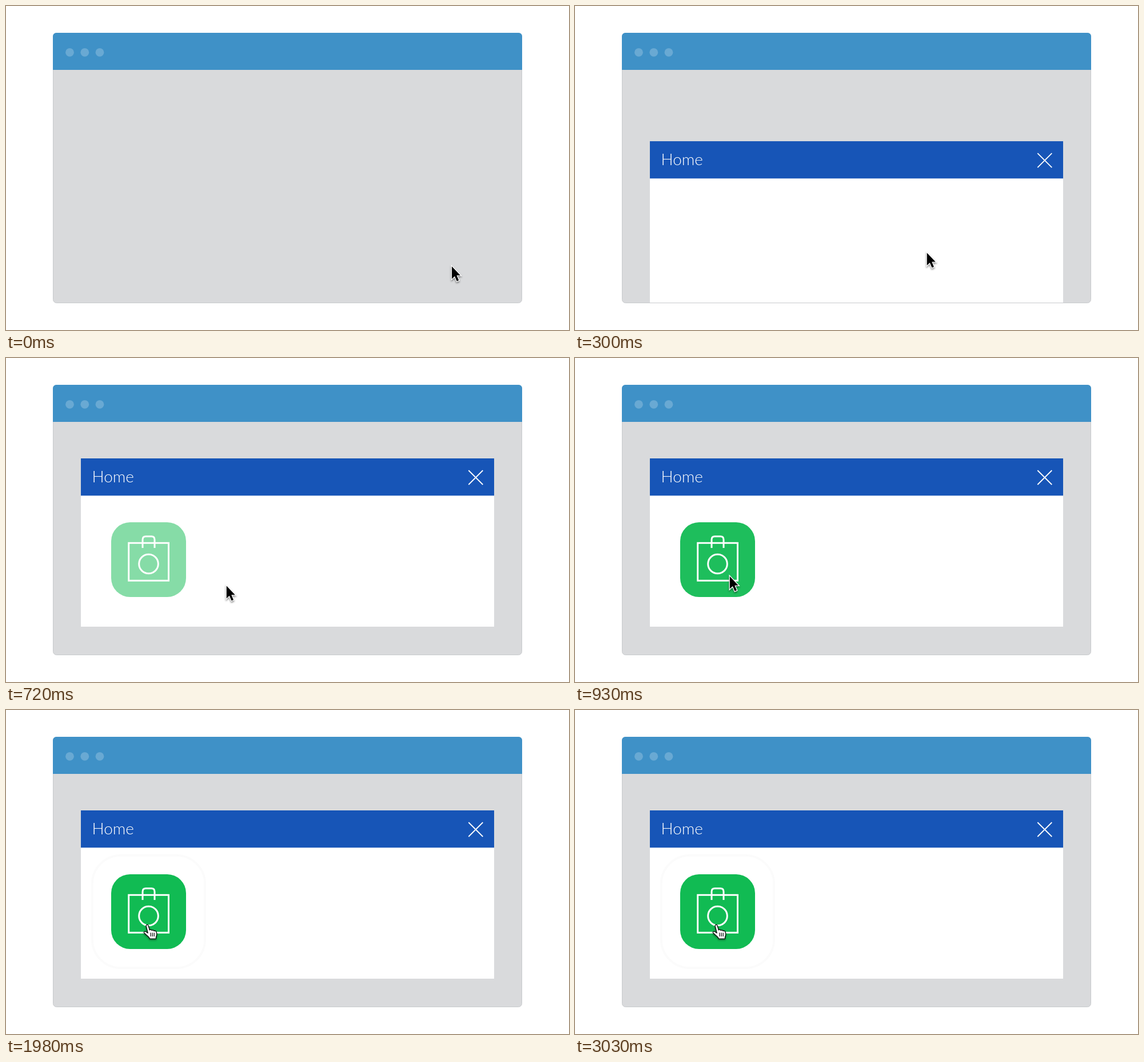
An HTML page that plays this animation: 985x568 px, repeating every 5.15 s.

```html
<!DOCTYPE html>
<html lang="en">
<head>
<meta charset="utf-8">
<title>Home window</title>
<style>
  html, body { margin: 0; width: 100%; height: 100%; overflow: hidden; background: #fff; }
  svg { display: block; width: 985px; height: 568px; }
  text { font: 300 28px Lato, sans-serif; fill: #fff; }
  .cursor { filter: drop-shadow(0 2px 1.5px rgba(0, 0, 0, .45)); }
  .line { fill: none; stroke: #fff; stroke-width: 3; }
</style>
</head>
<body>
<svg viewBox="0 0 985 568">
  <defs>
    <clipPath id="inside"><rect x="83" y="112" width="819" height="408"/></clipPath>
  </defs>

  <!-- browser window -->
  <rect x="82.5" y="47.5" width="820" height="473" rx="6" fill="#d9dadc" stroke="#c8cacd"/>
  <path d="M82 112V53a6 6 0 0 1 6-6H897a6 6 0 0 1 6 6V112Z" fill="#3f91c7"/>
  <g fill="#fff" fill-opacity=".22">
    <circle cx="111.5" cy="81.3" r="7.4"/>
    <circle cx="137.8" cy="81.3" r="7.4"/>
    <circle cx="164" cy="81.3" r="7.4"/>
  </g>

  <g clip-path="url(#inside)">
    <g id="panel">
      <rect x="131" y="176" width="723" height="295" fill="#fff"/>
      <rect x="131" y="176" width="723" height="65.3" fill="#1755b7"/>
      <text x="150.5" y="218">Home</text>
      <path d="M809.3 197l25 25m0-25l-25 25" class="line" style="stroke-width: 1.8"/>
    </g>
  </g>

  <g transform="translate(249.5 353.5)">
    <rect id="ring" x="-79" y="-79" width="158" height="158" rx="40" fill="none" stroke-width="3"/>
  </g>

  <g id="icon">
    <rect x="184" y="288" width="131" height="131" rx="33" fill="#11bb53"/>
    <rect x="214.7" y="324.3" width="69.8" height="66" class="line"/>
    <path d="M239 333V318.500Q239 312.700 244.500 312.700H254.500Q260 312.700 260 318.500V333" class="line"/>
    <circle cx="249.500" cy="361" r="16.800" class="line"/>
  </g>

  <g id="arrow" class="cursor">
    <path d="M0 1.500V23.500L5 18.700L8.800 27.500L12.200 26L8.500 17.300H15Z"
          fill="#000" stroke="#fff" stroke-width="2.600" paint-order="stroke"/>
  </g>

  <g id="hand" class="cursor" transform="translate(240 376)">
    <path d="M5.200 3C4.600 0.300 8.200 -0.500 9 2L11.300 9.800C12.300 8.300 14.700 8.800 15 10.500C16.300 9.200 18.600 9.800 19 11.500C20.300 10.500 22.200 11 22.800 12.700C24.500 16.500 24 19 22.500 22V25H11.500C10.500 21.500 6.500 19.500 2 15C0.300 13 2.500 11.500 4.500 12.500L8.200 15Z"
          fill="#fff" stroke="#000" stroke-width="1.200" stroke-linejoin="round"/>
    <path d="M12.800 14.500l.5 6.500M16 14.500l.3 6.500M19.200 14.500v6.500" stroke="#000" stroke-width="1.200"/>
  </g>
</svg>

<script>
  const LOOP = 5150;
  const PULSES = [1380, 2430];
  const [panel, icon, ring, arrow, hand] =
    ["panel", "icon", "ring", "arrow", "hand"].map(id => document.getElementById(id));

  const clamp = x => Math.min(1, Math.max(0, x));
  const mix = (a, b, p) => a + (b - a) * p;
  const show = (el, on) => el.setAttribute("visibility", on ? "visible" : "hidden");

  // cubic-bezier(.25, .1, .25, 1)
  function ease(x) {
    let lo = 0, hi = 1;
    for (let i = 0; i < 24; i++) {
      const s = (lo + hi) / 2;
      if (.75 * s * (1 - s) + s ** 3 < x) lo = s; else hi = s;
    }
    return .3 * lo * (1 - lo) ** 2 + 3 * lo * lo * (1 - lo) + lo ** 3;
  }
  const progress = (t, start, length) => ease(clamp((t - start) / length));

  function draw(time) {
    const t = Math.floor(time / 30) * 30;

    panel.setAttribute("transform", `translate(0 ${mix(380, 0, progress(t, 30, 500))})`);
    icon.setAttribute("opacity", progress(t, 570, 505));

    const arrived = t >= 990;
    arrow.setAttribute("transform", `translate(${780 - .5475 * t} ${455 - .0792 * t})`);
    show(arrow, !arrived);
    show(hand, arrived);

    const start = PULSES.filter(p => t >= p).pop();
    show(ring, start !== undefined);
    if (start !== undefined) {
      const age = Math.floor((t - start) / 60) * 60;
      const p = progress(age, 0, 600);
      ring.setAttribute("transform", `scale(${mix(1, 1.2485, p)})`);
      ring.setAttribute("stroke", `rgb(${mix(238, 251, p)} ${mix(237, 251, p)} ${mix(250, 251, p)})`);
    }
  }

  const origin = performance.now();
  function tick() {
    draw((performance.now() - origin) % LOOP);
    requestAnimationFrame(tick);
  }
  tick();
</script>
</body>
</html>
```
